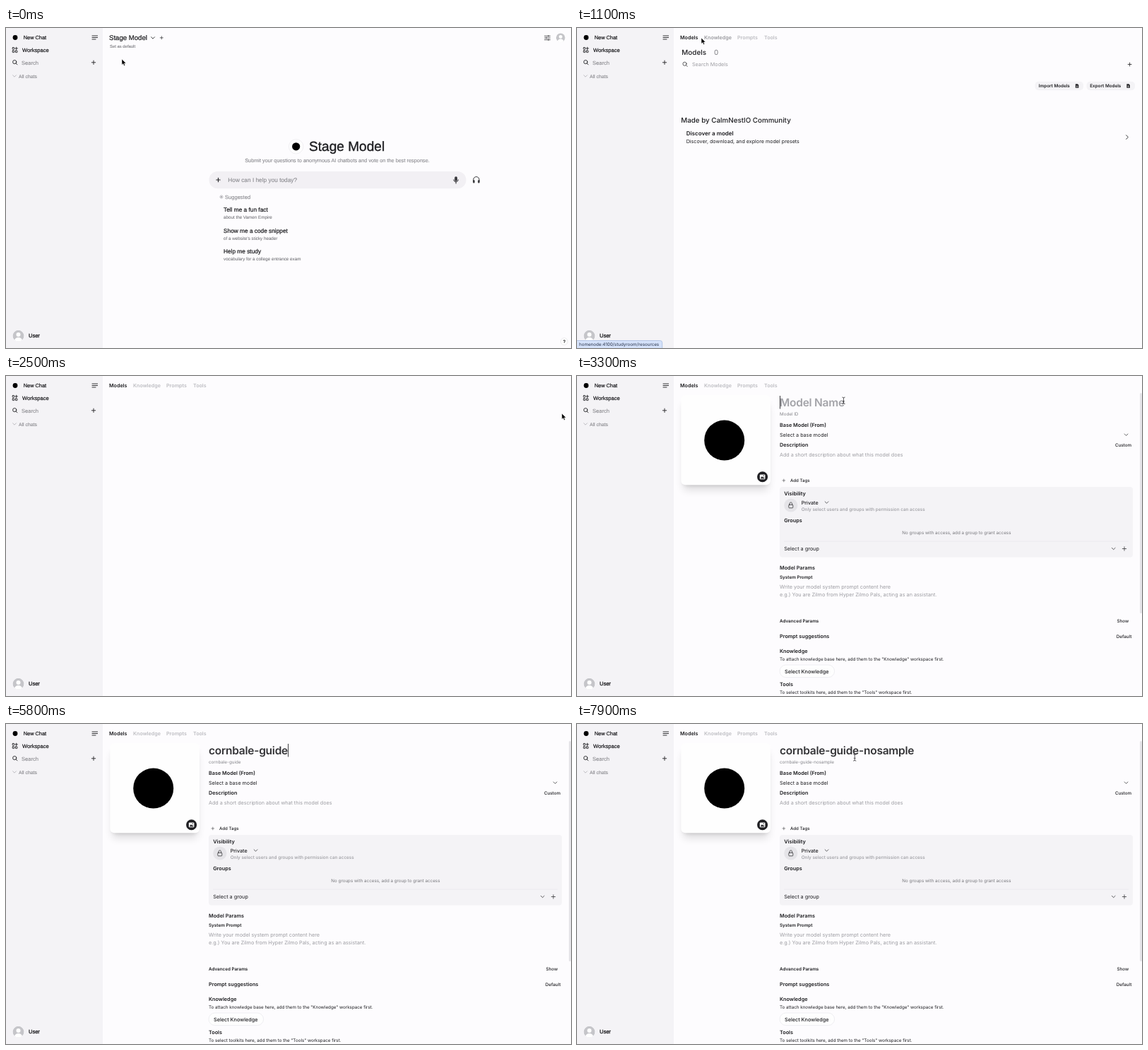
These frames come from a looping animation (800 px wide and 453 px high, 8000 ms). An HTML page:

```html
<!DOCTYPE html>
<html lang="en">
<head>
<meta charset="utf-8">
<title>Model workspace</title>
<style>
html, body { margin: 0; width: 100%; height: 100%; overflow: hidden; background: #fdfcfe; }
svg { display: block; width: 100vw; height: 100vh; }
text { font: 400 7.17px Inter, sans-serif; fill: #1d1d20; text-rendering: geometricPrecision; white-space: pre; }
.b { font-weight: 600; font-size: 7.25px; }
.xs { font-size: 6.26px; }
.m { font-weight: 500; }
.xb { font-weight: 600; font-size: 6.3px; }
.g { fill: #9c9ca1; }
.tab { font-weight: 600; font-size: 7.15px; fill: #bcbcc1; }
.a text { font-family: "Liberation Sans", Arial, sans-serif; font-size: 7.4px; stroke: #1d1d20; stroke-width: .22; }
.a .g { fill: #88888d; stroke: #88888d; stroke-width: .1; }
.a .t { font-size: 8.3px; }
.a .s { font-size: 6.28px; fill: #707075; stroke: #707075; stroke-width: .06; }
.big { font: 600 15.5px Inter, sans-serif; letter-spacing: -.25px; fill: #333336; }
.end { text-anchor: end; }
.mid { text-anchor: middle; }
.i { fill: none; stroke: #222225; stroke-width: .9; stroke-linecap: round; stroke-linejoin: round; }
.thin { stroke-width: .7; }
.pale { stroke: #a4a4a9; }
.panel { fill: #f4f3f6; }
</style>
</head>
<body>
<svg viewBox="0 0 800 453">
  <defs>
    <path id="plus" d="M-2.7 0H2.7M0-2.7V2.7"/>
    <path id="down" d="M-2.4-1.2L0 1.2 2.4-1.2"/>
    <g id="find"><circle cx="-.5" cy="-.5" r="2.6"/><path d="M1.4 1.4L3.3 3.3"/></g>
    <clipPath id="round"><circle r="8"/></clipPath>
    <g id="avatar" clip-path="url(#round)">
      <circle r="8" fill="#c5c5c9"/>
      <circle cy="-1.7" r="3" fill="#fff"/>
      <ellipse cy="7.2" rx="5.6" ry="5" fill="#fff"/>
    </g>
    <g id="file">
      <path d="M-2.2-2.8H.8L2.3-1.2V2.8H-2.2Z" fill="#222225"/>
      <path d="M0-1V1.7M-1.1.6L0 1.7 1.1.6" fill="none" stroke="#fff" stroke-width=".6"/>
    </g>
    <filter id="soft" x="-30%" y="-30%" width="160%" height="160%"><feGaussianBlur stdDeviation="6"/></filter>
    <filter id="tight" x="-30%" y="-30%" width="160%" height="160%"><feGaussianBlur stdDeviation="2.6"/></filter>
  </defs>

  <rect width="800" height="453" fill="#fdfcfe"/>

  <!-- sidebar -->
  <rect width="137" height="453" fill="#f4f3f6"/>
  <g class="a">
    <circle cx="13" cy="13.5" r="3.4" fill="#000"/>
    <text x="24.7" y="16.1">New Chat</text>
    <text x="23" y="33.8" style="font-size:7.55px">Workspace</text>
    <text x="22" y="51.6" class="g" style="font-size:7.55px">Search</text>
    <text x="18" y="70.6" class="g" style="font-size:6.85px">All chats</text>
    <text x="32" y="438.4" style="font-size:7.5px;stroke-width:.32">User</text>
  </g>
  <g class="i">
    <path d="M122 11H129.6M122 13.5H129.6M122 16H127"/>
    <rect x="9.2" y="27.6" width="2.6" height="2.6" rx=".5"/>
    <rect x="9.2" y="32" width="2.6" height="2.6" rx=".5"/>
    <rect x="13.4" y="32" width="2.6" height="2.6" rx=".5"/>
    <path d="M14.7 27.2V30.6M13 28.9H16.4"/>
    <use href="#find" x="12.7" y="48.6"/>
    <use href="#plus" x="124" y="48.8"/>
    <use href="#down" x="12" y="68" class="thin pale"/>
  </g>
  <use href="#avatar" x="17.5" y="435.8"/>

  <!-- chat page -->
  <g id="chat" class="a">
    <text x="146" y="17.3" style="font-size:9.6px">Stage Model</text>
    <text x="147" y="28.4" class="s" style="font-size:5.9px">Set as default</text>
    <g class="i">
      <use href="#down" x="208" y="14"/>
      <use href="#plus" transform="translate(220.3 13.8) scale(.75)"/>
      <path class="thin" d="M762.5 11.3H770.5M762.5 14H770.5M762.5 16.7H770.5M768 10.4V12.2M765 13.1V14.9M768 15.8V17.6"/>
      <use href="#plus" x="300.5" y="215" stroke-width="1.1"/>
      <path d="M633.9 214.8C633.9 219 640.3 219 640.3 214.8M637.1 218.2V220.2"/>
      <path d="M661.8 217V214.8C661.8 209.2 670 209.2 670 214.8V217"/>
      <path class="pale thin" d="M305 236.6V241.6M302.5 239.1H307.5M303.4 237.5L306.6 240.7M306.6 237.5L303.4 240.7"/>
    </g>
    <use href="#avatar" transform="translate(785.3 13.8) scale(.81)"/>
    <circle cx="410.7" cy="167.8" r="10.2" fill="#fff" stroke="#e6e5e9" stroke-width=".6"/>
    <circle cx="410.7" cy="167.8" r="5.6" fill="#000"/>
    <text x="429" y="174.2" style="font-size:19.1px;stroke-width:.35">Stage Model</text>
    <text x="469" y="190.1" class="g mid" style="font-size:7.33px">Submit your questions to anonymous AI chatbots and vote on the best response.</text>
    <rect x="287.5" y="203" width="364" height="24.3" rx="12.1" fill="#f4f3f5" style="mix-blend-mode:multiply"/>
    <rect x="635.2" y="210.2" width="3.8" height="6.8" rx="1.9" fill="#3b3b3f"/>
    <rect x="661.2" y="215.2" width="2.4" height="4.3" rx="1" fill="#333337"/>
    <rect x="668.2" y="215.2" width="2.4" height="4.3" rx="1" fill="#333337"/>
    <text x="314.3" y="218" class="g t">How can I help you today?</text>
    <text x="310" y="242" class="g" style="font-size:7.55px">Suggested</text>
    <text x="308" y="260.2" class="t">Tell me a fun fact</text>
    <text x="308" y="270.3" class="s">about the Vamen Empire</text>
    <text x="308" y="289.8" class="t">Show me a code snippet</text>
    <text x="308" y="299.8" class="s">of a website's sticky header</text>
    <text x="308" y="319.4" class="t">Help me study</text>
    <text x="308" y="329.4" class="s">vocabulary for a college entrance exam</text>
    <circle cx="790.4" cy="443.8" r="5" fill="#fff" stroke="#e3e2e6" stroke-width=".7"/>
    <text x="790.4" y="446.1" class="mid" style="font-size:6.2px">?</text>
  </g>

  <!-- workspace tabs -->
  <g id="tabs">
    <text x="146" y="15.6" class="tab" style="fill:#1d1d20">Models</text>
    <text x="180" y="15.6" class="tab" id="know">Knowledge</text>
    <text x="227" y="15.6" class="tab">Prompts</text>
    <text x="265" y="15.6" class="tab">Tools</text>
  </g>

  <!-- model list -->
  <g id="list">
    <text x="148.3" y="38" class="m" style="font-size:9.9px">Models</text>
    <text x="194" y="38" style="font-size:9.9px;fill:#77777c">0</text>
    <text x="163" y="54" class="g" style="font-size:7.2px">Search Models</text>
    <rect x="648.5" y="75.7" width="68.5" height="12.6" rx="5" class="panel"/>
    <rect x="721.5" y="75.7" width="68.5" height="12.6" rx="5" class="panel"/>
    <text x="653.8" y="84.2" class="xb">Import Models</text>
    <text x="726.3" y="84.2" class="xb">Export Models</text>
    <use href="#file" x="708" y="82"/>
    <use href="#file" x="780.6" y="82"/>
    <text x="147.3" y="134.2" class="m" style="font-size:9.8px">Made by CalmNestIO Community</text>
    <text x="154.7" y="152.4" class="b" style="font-size:8.05px">Discover a model</text>
    <text x="154.7" y="163.3">Discover, download, and explore model presets</text>
    <g class="i">
      <use href="#find" x="153" y="51.3" class="thin"/>
      <use href="#plus" transform="translate(782.6 51.5) scale(.9)"/>
      <path d="M777.6 151.7L780.4 154.5 777.6 157.3"/>
    </g>
  </g>

  <!-- model editor -->
  <g id="editor">
    <rect x="150" y="40" width="121.5" height="122" rx="6" opacity=".11" filter="url(#soft)"/>
    <rect x="150.3" y="34" width="120.7" height="121.5" rx="6" opacity=".13" filter="url(#tight)"/>
    <rect x="147.3" y="27" width="126.7" height="127.3" rx="6" fill="#fefefe"/>
    <circle cx="208.7" cy="91" r="28.5" fill="#000"/>
    <circle cx="262.6" cy="142.8" r="7.5" fill="#1f1f22"/>
    <rect x="258.8" y="139.4" width="7.6" height="6.8" rx="1" fill="#fff"/>
    <path d="M259.7 145.2L261.9 142.1 263.3 143.8 264.2 142.9 265.6 145.2Z" fill="#1f1f22"/>
    <circle cx="264.2" cy="141.2" r=".7" fill="#1f1f22"/>

    <text x="287" y="43.4" class="big" id="name"></text>
    <rect id="caret" y="28" width=".9" height="18.5" fill="#222225"/>
    <text x="287" y="56.3" class="xs" id="slug" style="fill:#85858a"></text>
    <text x="287" y="71.6" class="b">Base Model (From)</text>
    <text x="287" y="85.8">Select a base model</text>
    <text x="287" y="100.3" class="b">Description</text>
    <text x="785" y="100" class="xs m end">Custom</text>
    <text x="287" y="113.9" class="g">Add a short description about what this model does</text>
    <text x="302" y="150.2" class="xs m" style="font-size:6.1px">Add Tags</text>

    <rect x="287" y="157" width="500" height="99.6" rx="4" class="panel"/>
    <text x="293.2" y="168.9" class="b" style="font-size:7.35px">Visibility</text>
    <circle cx="302.8" cy="183" r="9.6" fill="#e5e4e8"/>
    <text x="317.7" y="181.6" class="m">Private</text>
    <text x="317.7" y="190.9" class="xs m g" style="font-size:6.38px">Only select users and groups with permission can access</text>
    <text x="293.2" y="206.9" class="b">Groups</text>
    <text x="537.4" y="223.7" class="xs mid" style="fill:#77777c">No groups with access, add a group to grant access</text>
    <path d="M293 234.1H781" stroke="#e4e3e7" stroke-width=".6"/>
    <text x="293.2" y="247.1" style="font-size:7.25px">Select a group</text>

    <text x="287" y="273.6" class="b">Model Params</text>
    <text x="287" y="287.1" class="xb">System Prompt</text>
    <text x="287" y="301" class="g" style="font-size:7.25px">Write your model system prompt content here</text>
    <text x="287" y="311.8" class="g" style="font-size:7.25px">e.g.) You are Zilmo from Hyper Zilmo Pals, acting as an assistant.</text>
    <text x="287" y="349.4" class="xb">Advanced Params</text>
    <text x="781.2" y="349.4" class="xs m end">Show</text>
    <text x="287" y="371.3" class="b">Prompt suggestions</text>
    <text x="785.3" y="371.2" class="xs m end">Default</text>
    <text x="287" y="392" class="b">Knowledge</text>
    <text x="287" y="403.3" class="xs">To attach knowledge base here, add them to the "Knowledge" workspace first.</text>
    <rect x="287" y="409" width="77.6" height="17.6" rx="8.8" fill="#fefefe" stroke="#e9e8ec" stroke-width=".7"/>
    <text x="294" y="420.5" class="m" style="font-size:7.25px">Select Knowledge</text>
    <text x="287" y="438.6" class="b">Tools</text>
    <text x="287" y="449.8" class="xs">To select toolkits here, add them to the "Tools" workspace first.</text>

    <g class="i thin">
      <rect x="299.8" y="182.2" width="6" height="4.6" rx=".9"/>
      <path d="M301 182.2V180.8C301 178.3 304.6 178.3 304.6 180.8V182.2"/>
      <use href="#down" x="777.6" y="83.2"/>
      <use href="#down" x="353.5" y="179"/>
      <use href="#down" x="759.7" y="244.5"/>
      <use href="#plus" x="775" y="244.5"/>
      <use href="#plus" transform="translate(292.8 147.9) scale(.7)"/>
    </g>
    <rect x="797" y="24" width="3" height="312" rx="1.5" fill="#e6e5e9"/>
  </g>

  <!-- link status -->
  <g id="status">
    <path id="strip" fill="#d5e2fa" stroke="#9fb6de" stroke-width=".7"/>
    <text x="3" y="450.2" class="xs" id="link" style="fill:#27324a"></text>
  </g>

  <path id="arrow" d="M0 0V8.3L1.9 6.5 3.2 9.4 4.6 8.8 3.4 6H6Z" fill="#000" stroke="#fff" stroke-width=".5"/>
  <path id="beam" class="i thin" d="M-1.7-4.7Q0-4.7 0-3.6Q0-4.7 1.7-4.7M0-3.6V3.6M-1.7 4.7Q0 4.7 0 3.6Q0 4.7 1.7 4.7M-1 .9H1"/>
</svg>
<script>
const LOOP = 8000, STEP = 100;
const NAME = "cornbale-guide-nosample";
const HOST = "homenode:4100/studyroom";

// pointer stops: time, x, y
const PATH = [
  [0, 164, 44], [100, 148, 42], [400, 47, 31], [600, 44, 31],
  [900, 160, 19], [1000, 173, 16], [1100, 176, 14], [1300, 236, 16],
  [1700, 617, 45], [1800, 617, 45], [2100, 776, 50], [2200, 782, 51],
  [2300, 783, 51], [2500, 787, 53], [2600, 785, 52], [2700, 765, 48],
  [2800, 418, 60], [2900, 418, 60], [3200, 379, 36], [3300, 377.5, 34.8],
  [7700, 377.5, 34.8], [7800, 380.5, 39], [7900, 393.2, 47.5]
];

// key bursts: first key time, number of keys
const BURSTS = [[3800, 1], [4000, 3], [4400, 4], [5200, 4], [5700, 2], [6300, 1], [6500, 1], [6700, 3], [7100, 4]];

// hovered links: from, to, address
const LINKS = [[300, 700, ""], [1000, 1500, "/resources"], [2100, 2400, "/models/create"]];

const el = {};
document.querySelectorAll("svg [id]").forEach(n => el[n.id] = n);

const show = (node, on) => node.style.display = on ? "" : "none";
const within = (t, a, b) => t >= a && t < b;

function pointerAt(t) {
  const i = PATH.findIndex(p => p[0] > t);
  if (i < 0) return PATH[PATH.length - 1].slice(1);
  const [t0, x0, y0] = PATH[i - 1], [t1, x1, y1] = PATH[i];
  const k = (t - t0) / (t1 - t0);
  return [x0 + (x1 - x0) * k, y0 + (y1 - y0) * k];
}

function typedAt(t) {
  return BURSTS.reduce((n, [start, keys]) =>
    n + Math.max(0, Math.min(keys, Math.floor((t - start) / STEP) + 1)), 0);
}

function drawEditor(t) {
  const value = NAME.slice(0, typedAt(t));
  el.name.textContent = value || "Model Name";
  el.name.style.fill = value ? "" : "#a3a3a8";
  el.slug.textContent = value || "Model ID";
  show(el.caret, within(t, 3300, 7800));
  el.caret.setAttribute("x", 287 + (value ? el.name.getComputedTextLength() + .2 : 0));
}

function drawStatus(t) {
  const hit = LINKS.find(([a, b]) => within(t, a, b));
  show(el.status, hit);
  if (!hit) return;
  el.link.textContent = HOST + hit[2];
  const w = el.link.getComputedTextLength() + 7.5;
  el.strip.setAttribute("d", `M-1 442.5H${w - 3}Q${w} 442.5 ${w} 445.5V454H-1Z`);
}

function drawPointer(t) {
  const [x, y] = pointerAt(t);
  const hidden = within(t, 3800, 7800), text = t >= 3100;
  show(el.arrow, !hidden && !text);
  show(el.beam, !hidden && text);
  (text ? el.beam : el.arrow).setAttribute("transform", `translate(${x} ${y})`);
}

function draw(time) {
  const t = Math.floor(time % LOOP / STEP) * STEP;
  show(el.chat, t < 600);
  show(el.tabs, t >= 600);
  show(el.list, within(t, 700, 2400));
  show(el.editor, t >= 2600);
  el.know.style.fill = within(t, 1000, 1300) ? "#98989d" : "";
  if (t >= 2600) drawEditor(t);
  drawStatus(t);
  drawPointer(t);
}

const begin = performance.now();
function tick() {
  draw(performance.now() - begin);
  requestAnimationFrame(tick);
}
tick();
</script>
</body>
</html>
```
